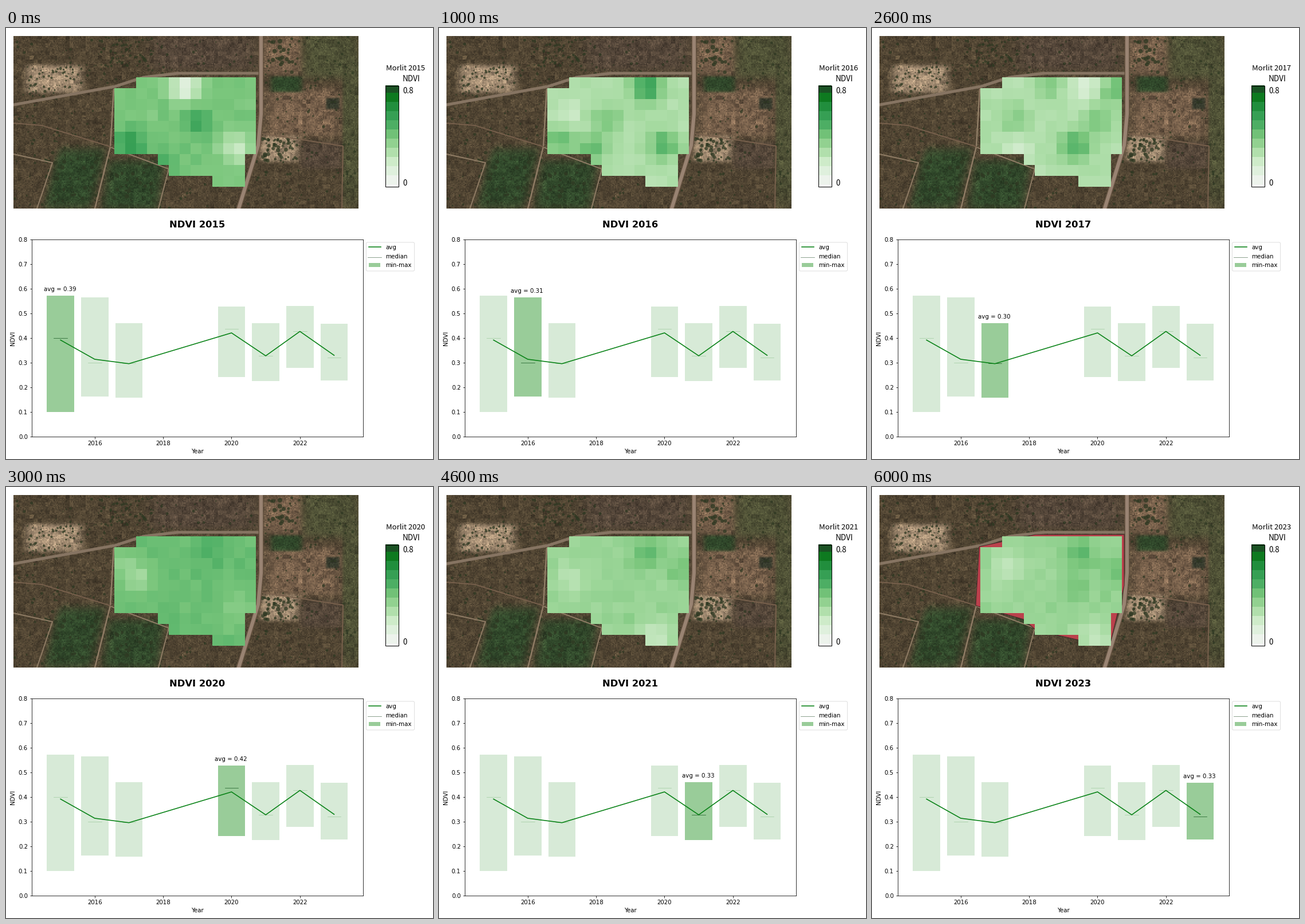
Write a matplotlib script that moves like this. It is 745 px wide and 752 px high and loops after 7 s.

```python
import numpy as np
import matplotlib.pyplot as plt
from matplotlib.animation import FuncAnimation
from matplotlib.colors import LinearSegmentedColormap, to_rgb
from matplotlib.patches import FancyBboxPatch, Polygon, Rectangle

W, H, DPI = 745, 752, 64
PX = 72 / DPI  # points per pixel
SMALL = 10.2 * PX
rng = np.random.default_rng(12)

plt.rcParams["font.family"] = "DejaVu Sans"
fig = plt.figure(figsize=(W / DPI, H / DPI), dpi=DPI, facecolor="white")

years = [2015, 2016, 2017, 2020, 2021, 2022, 2023]
low = [0.1, 0.162, 0.157, 0.243, 0.225, 0.28, 0.227]
high = [0.573, 0.564, 0.46, 0.527, 0.46, 0.53, 0.457]
avg = [0.392, 0.314, 0.296, 0.421, 0.328, 0.427, 0.33]
median = [0.401, 0.299, 0.297, 0.437, 0.328, 0.429, 0.321]


def pixel_axes(x0, y0, x1, y1):
    """Axes over a pixel box, with pixel coordinates counted from the top."""
    ax = fig.add_axes([x0 / W, 1 - y1 / H, (x1 - x0) / W, (y1 - y0) / H])
    ax.set_xlim(x0, x1)
    ax.set_ylim(y1, y0)
    ax.set_autoscale_on(False)
    return ax


# ---- aerial view: soft tones, grain, trees and tracks ----
X0, Y0, X1, Y1 = 13, 14, 615, 315
land = pixel_axes(X0, Y0, X1, Y1)
land.axis("off")
EARTH, SOIL, SAND = "#55473a", "#77604b", "#a58e74"
WOOD, GRASS, WATER = "#324a2c", "#4f5136", "#33372a"
yy, xx = np.mgrid[Y0:Y1, X0:X1] + 0.5
ground = np.ones(yy.shape + (1,)) * to_rgb("#514533")


def patch(tone, x, y, w, h, lean=0.0):
    """Blend in a soft-edged field of half size w by h."""
    dx = (xx - x - lean * (yy - y)) / w
    weight = np.exp(-(dx ** 8 + ((yy - y) / h) ** 8))[..., None]
    ground[:] += weight * (np.array(to_rgb(tone)) - ground)


def grain(size, strength):
    ny, nx = (n // size + 1 for n in yy.shape)
    noise = rng.normal(1, strength, (ny, nx)).repeat(size, 0).repeat(size, 1)
    ground[:] *= noise[:yy.shape[0], :yy.shape[1], None]


def trees(n, x, y, w, h, size=4):
    land.scatter(rng.uniform(x - w, x + w, n), rng.uniform(y - h, y + h, n),
                 s=(rng.uniform(0.5, 1.3, n) * size * PX) ** 2,
                 color="#2e3822", lw=0, alpha=0.75, zorder=2)


def track(color, width, *pts):
    land.plot(*zip(*pts), color=color, lw=width * PX, zorder=3)


patch(EARTH, 345, 45, 95, 30)
patch(SAND, 84, 90, 50, 25)
patch(WOOD, 120, 263, 42, 54, -0.25)
patch(WOOD, 222, 274, 50, 44, -0.15)
patch(SOIL, 482, 49, 34, 35)
patch(GRASS, 567, 50, 50, 40)
patch(SOIL, 518, 148, 68, 44)
patch(WOOD, 489, 99, 28, 14)
patch(SAND, 478, 211, 35, 23)
patch(EARTH, 550, 222, 38, 24)
patch(GRASS, 602, 185, 15, 130)
patch(WATER, 570, 133, 12, 10)
grain(2, 0.09)
grain(7, 0.08)
land.imshow(np.clip(ground, 0, 1), extent=(X0, X1, Y1, Y0), aspect="auto",
            interpolation="nearest")

trees(420, 314, 165, 300, 150)
trees(70, 210, 42, 50, 26)
trees(45, 84, 92, 48, 25, 3.5)
trees(45, 478, 211, 32, 21, 6)
trees(30, 482, 48, 30, 32, 6.5)
trees(90, 170, 265, 100, 48, 6)

PALE, FAINT = "#8f7c65", "#77604c"
track(PALE, 2, (13, 220), (81, 235), (54, 315))
track(PALE, 2.5, (188, 107), (182, 207), (155, 315))
track(PALE, 2, (182, 208), (284, 246), (266, 315))
track(FAINT, 2, (13, 166), (62, 170), (182, 207))
track(FAINT, 2, (446, 184), (588, 206), (586, 315))
track("#867462", 5, (13, 134), (190, 102), (240, 86), (300, 79), (445, 79))
for width, tone in ((9, "#665442"), (6, "#998372")):
    track(tone, width, (445, 13), (445, 150), (440, 205), (405, 318))

# ---- NDVI cells: those whose centre lies in the plot ----
plot = Polygon([(187, 104), (285, 83), (440, 83), (440, 172), (415, 276),
                (361, 267), (286, 250), (265, 231), (181, 207)],
               fc="#bb414c", ec="#46292a", lw=PX, zorder=4)
land.add_patch(plot)
CELL, COLS, ROWS = 19, 13, 10
LEFT, TOP = 189, 87
row, col = np.mgrid[:ROWS, :COLS]
centres = np.column_stack([LEFT + CELL * (col.ravel() + 0.5),
                           TOP + CELL * (row.ravel() + 0.5)])
outside = ~plot.get_path().contains_points(centres).reshape(row.shape)
ndvi_map = LinearSegmentedColormap.from_list("ndvi", [
    "#f5f5f5", "#e6f2e5", "#ceebc9", "#a5daa0", "#7ac67c", "#48ac62",
    "#2c974c", "#0e7e20", "#1e4626"])

# Greener and barer spots per year: column, row, rise
SPOTS = {
    2015: [(6, 0.4, -0.3), (7.2, 3.5, 0.13), (1, 5.6, 0.18),
           (10.6, 5.9, -0.2), (4, 7.3, 0.1)],
    2016: [(8.7, 0.4, 0.3), (5, 3.3, 0.12), (3.6, 6, 0.17),
           (10.3, 5.6, 0.2), (0.6, 5.3, 0.15), (1.5, 3, -0.06)],
    2017: [(6, 0.3, 0.09), (9, 0.6, -0.14), (12, 0.5, 0.15),
           (2.7, 3.5, 0.1), (8.2, 5.8, 0.22), (10.3, 3.4, 0.12),
           (3, 6, -0.09)],
    2020: [(1.8, 3.4, -0.13), (0.3, 2, -0.06), (8.3, 1, 0.06),
           (10.8, 5.6, -0.07)],
    2021: [(1.8, 3.3, -0.1), (8.6, 1.2, 0.12), (12, 2.5, 0.08),
           (9.5, 8.6, -0.12)],
    2023: [(2, 2.4, -0.1), (8.7, 1, 0.13), (12, 2.8, 0.1),
           (8.4, 4.3, 0.08), (10, 8.6, -0.12)],
}


def field(year):
    i = years.index(year)
    v = rng.normal(0, 0.012, row.shape)
    for x, y, rise in SPOTS[year]:
        v += rise * np.exp(-((col - x) ** 2 + (row - y) ** 2) / 1.8)
    v += avg[i] - v[~outside].mean()
    return np.ma.array(v.clip(low[i], high[i]), mask=outside)


cells = {year: field(year) for year in SPOTS}
cells[2022] = cells[2020]
scale = dict(cmap=ndvi_map, vmin=0, vmax=0.8, aspect="auto",
             interpolation="nearest")
heat = land.imshow(cells[2015], zorder=5, extent=(
    LEFT, LEFT + CELL * COLS, TOP + CELL * ROWS, TOP), **scale)

# ---- colour key, titles and legend ----
side = pixel_axes(0, 0, W, H)
side.axis("off")


def label(x, y, text, size=SMALL, **kw):
    return side.text(x, y, text, fontsize=size, va="baseline", **kw)


KEY_TOP, KEY_END, BAND = 100, 277, 16
key_y = np.arange(KEY_TOP, KEY_END)
band_mid = (key_y - 1) // BAND * BAND + 1 + BAND / 2
key = (KEY_END - band_mid) / (KEY_END - KEY_TOP) * 0.8
side.imshow(key[:, None], extent=(662, 685, KEY_END, KEY_TOP), **scale)
side.add_patch(Rectangle((662, 101), 23, 176, fill=False, ec="black", lw=PX))

humanist = dict(family="Noto Sans CJK JP", size=13.5 * PX)
place = label(663, 74, "", **{**humanist, "size": 13.1 * PX})
label(692, 93, "NDVI", **humanist)
label(692, 114, "0.8", **humanist)
label(692, 275, "0", **humanist)

MID = 334
title = label(MID, 348, "", 16.4 * PX, ha="center", weight="bold")
label(MID, 742.5, "Year", ha="center")
side.text(12, 541, "NDVI", fontsize=SMALL, rotation=90, ha="center",
          va="center")

GREEN, ACTIVE, IDLE = "#088216", "#99cc99", "#d7ead7"
side.add_patch(FancyBboxPatch((630.5, 376), 80, 46, ec="#d6d6d6", fc="white",
                              boxstyle="round,pad=2", lw=0.8 * PX))
side.plot([632.5, 654], [382, 382], color=GREEN, lw=1.6 * PX)
side.plot([631, 655], [400, 400], color="#5f7d62", lw=0.7 * PX)
side.add_patch(Rectangle((632.5, 409.5), 20.5, 7.5, color=ACTIVE, lw=0))
for k, name in enumerate(("avg", "median", "min-max")):
    label(662, 386 + 15.6 * k, name)

# ---- yearly chart ----
chart = pixel_axes(45, 369, 622.6, 713)
chart.set_xlim(2014.16, 2023.84)
chart.set_ylim(0, 0.8)
bars = chart.bar(years, np.subtract(high, low), 0.8, low, lw=0)
marks = [chart.plot([x - 0.2, x + 0.2], [m, m], lw=0.7 * PX)[0]
         for x, m in zip(years, median)]
chart.plot(years, avg, color=GREEN, lw=1.6 * PX)
note = chart.text(0, 0, "", fontsize=SMALL, ha="center", va="baseline")
chart.set_xticks(range(2016, 2023, 2))
chart.set_yticks(np.arange(9) / 10)
chart.tick_params(labelsize=SMALL, length=3.5 * PX, width=0.8 * PX,
                  pad=3.5 * PX)
for spine in chart.spines.values():
    spine.set_linewidth(0.8 * PX)


def show(i):
    year = years[i]
    heat.set_data(cells[year])
    plot.set_visible(year == 2023)
    place.set_text(f"{'Morliit' if year == 2022 else 'Morlit'} {year}")
    title.set_text(f"NDVI {year}")
    for j, (bar, mark) in enumerate(zip(bars, marks)):
        bar.set_facecolor(ACTIVE if j == i else IDLE)
        mark.set_color("#195a23" if j == i else "#a0cba0")
    note.set_position((year - 0.02, high[i] + 0.0186))
    note.set_text(f"avg = {avg[i]:.2f}")
    return []


anim = FuncAnimation(fig, show, frames=len(years), interval=1000, repeat=True,
                     repeat_delay=0, init_func=lambda: show(0))
plt.show()
```
